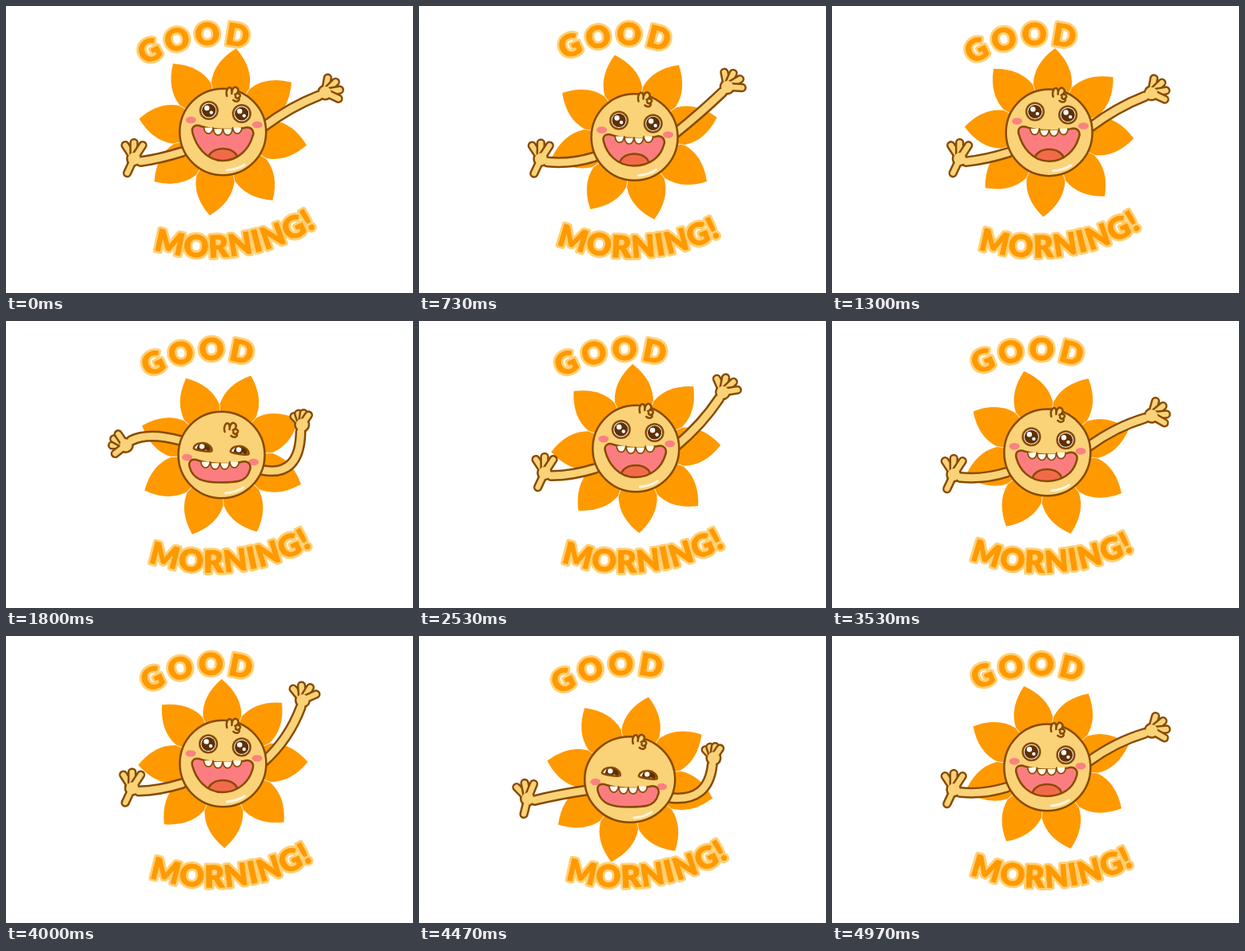
Animation, 509 px wide and 360 px high, one loop 5 s. Source, as an HTML page:

```html
<!DOCTYPE html>
<html lang="en">
<head>
<meta charset="utf-8">
<title>Good morning</title>
<style>
  html, body { margin: 0; width: 100%; height: 100%; overflow: hidden; background: #fff; }
  svg { display: block; width: 100%; height: 100%; }
  .line { stroke: #874b00; stroke-width: 2.5; stroke-linejoin: round; stroke-linecap: round; }
  .limb { fill: none; stroke-linecap: round; stroke-linejoin: round; }
  .word { font: 900 38px Lato, "Open Sans", sans-serif; text-anchor: middle; stroke-linejoin: round; }
  .glow { fill: #ffd074; stroke: #ffd074; stroke-width: 6.5; }
  .ink { fill: #ff9900; stroke: #ff9900; stroke-width: .8; }
</style>
</head>
<body>
<svg viewBox="0 0 509 360" xmlns="http://www.w3.org/2000/svg">
  <defs>
    <path id="upperArc" d="M-164 0A164 164 0 0 1 164 0" transform="translate(263.6 212.4) rotate(-9)"/>
    <path id="lowerArc" d="M-253 0A253 253 0 0 0 253 0" transform="translate(255 62.4) rotate(-8)"/>
    <clipPath id="mouthClip"><path class="mouthShape"/></clipPath>
    <clipPath id="eyeClipL"><path class="eyeShapeL"/></clipPath>
    <clipPath id="eyeClipR"><path class="eyeShapeR"/></clipPath>
  </defs>
  <g id="words" class="word"></g>
  <g id="body">
    <g id="rays" fill="#ff9900"></g>
    <g id="arms"></g>
    <ellipse id="disc" class="line" fill="#fad278"/>
    <path d="M5 48Q18 47 27 41" fill="none" stroke="#fff4dc" stroke-width="3.2" stroke-linecap="round"/>
    <g id="cheeks" fill="#fb8181">
      <ellipse cx="-40" cy="-15" rx="6.5" ry="4.2"/>
      <ellipse cx="43" cy="-9" rx="6.5" ry="4.2"/>
    </g>
    <g clip-path="url(#mouthClip)">
      <path class="mouthShape" fill="#fc7d80"/>
      <ellipse id="tongue" class="line" rx="18" ry="12" fill="#f36a4b"/>
    </g>
    <path class="mouthShape line" fill="none"/>
    <path id="teeth" class="line" fill="#fffbee" style="stroke-width:1.7"/>
    <g id="eyes"></g>
    <path id="hair" class="line" fill="#fad278"
      d="M-9 5C-11 -2 -7 -8 -4 -5C-2 -3 -3 1 -3 2C-3 -5 1 -8 4 -5C7 -2 4 2 1 3C6 0 10 4 6 7C4 9 1 7 2 5M6 7C8 12 2 13 -1 10"/>
  </g>
</svg>
<script>
const find = s => document.querySelector(s);
const set = (el, attrs) => { for (const n in attrs) el.setAttribute(n, attrs[n]); return el; };
const add = (parent, tag, attrs) =>
  parent.appendChild(set(document.createElementNS('http://www.w3.org/2000/svg', tag), attrs));
const setAll = (s, attrs) => document.querySelectorAll(s).forEach(el => set(el, attrs));
const mix = (a, b, u) => Array.isArray(a) ? a.map((v, i) => mix(v, b[i], u)) : a + (b - a) * u;
const smooth = u => (1 - Math.cos(Math.PI * Math.min(1, Math.max(0, u)))) / 2;
// Eases up from a to b, holds, then eases down from c to d
const pulse = (t, a, b, c, d) => smooth((t - a) / (b - a)) * (1 - smooth((t - c) / (d - c)));

const CYCLE = 36;  // steps at 25 per second
const LOOP = 5000;
const SKIN = '#fad278', BROWN = '#874b00', OUTLINE = 5;

function track(keys, step) {
  let i = 1;
  while (i < keys.length - 1 && step > keys[i][0]) i++;
  const [a, from] = keys[i - 1], [b, to] = keys[i];
  return mix(from, to, smooth((step - a) / (b - a)));
}

for (const [text, arc, spacing] of [['GOOD', '#upperArc', 5], ['MORNING!', '#lowerArc', 1.5]])
  for (const layer of ['glow', 'ink']) {
    const line = add(find('#words'), 'text', { class: layer, 'letter-spacing': spacing });
    add(line, 'textPath', { href: arc, startOffset: '50%' }).textContent = text;
  }

for (let i = 0; i < 8; i++)
  add(find('#rays'), 'path', { d: 'M0 0L-24 -59Q-25 -85 0 -106Q25 -85 24 -59Z', transform: `rotate(${i * 45})` });

// An outlined limb: dark arm, separately outlined digits, then light arm and palm
function makeArm(side, palm, digitAngle, digitLength) {
  const g = add(find('#arms'), 'g', { class: 'limb' });
  const stroke = (color, width) => add(g, 'path', { stroke: color, 'stroke-width': width });
  const arm = { side, palm, digitAngle, digitLength };
  const darkArm = stroke(BROWN, 9 + OUTLINE), darkPalm = stroke(BROWN, 15 + OUTLINE);
  arm.digits = [0, 1, 2, 3].map(() => [stroke(BROWN, 6.4 + OUTLINE), stroke(SKIN, 6.4)]);
  arm.lines = [darkArm, stroke(SKIN, 9)];
  arm.palms = [darkPalm, stroke(SKIN, 15)];
  return arm;
}
const leftArm = makeArm(-1, [-8, -4],
  (i, curl) => i < 3 ? mix(-30 + 33 * i, -22 + 28 * i, curl) : mix(-152, -60, curl),
  curl => mix(20, 17, curl));
const rightArm = makeArm(1, [1, -9],
  (i, curl) => mix(-47 + 35 * i, -48 + 26 * i, curl),
  curl => mix(18.5, 14.5, curl));

// pose: shoulder height, bend x y, wrist x y, hand angle, finger curl
function drawArm(arm, [shoulder, bx, by, wx, wy, angle, curl]) {
  const place = `translate(${wx} ${wy}) rotate(${angle})`;
  const [px, py] = arm.palm;
  for (const el of arm.lines) set(el, { d: `M${51 * arm.side} ${shoulder}Q${bx} ${by} ${wx} ${wy}` });
  for (const el of arm.palms) set(el, { transform: place, d: `M${px} ${py}h.1` });
  arm.digits.forEach((pair, i) => {
    const turn = arm.digitAngle(i, curl) * Math.PI / 180, reach = arm.digitLength(curl);
    const d = `M${px} ${py}l${reach * Math.sin(turn)} ${-reach * Math.cos(turn)}`;
    for (const el of pair) set(el, { transform: place, d });
  });
}

function rightPose(step, crouch) {
  const up = [-2, 82, -30, 96, -72, 5, 0];
  const out = [-7, 85, -32, 122, -43, 62, 0];
  const folded = [19 + 4 * crouch, 98, 28, 99 + 4 * crouch, -29 + 11 * crouch, 4, 1];
  const wave = (1 - Math.cos(2 * Math.PI * (step - 16) / 8.4)) / 2;
  return mix(mix(out, up, wave), folded, pulse(step, 0, 3, 12.5, 16));
}

function leftPose(step, sway) {
  const rest = [25, -80, 34, -106 + 3 * sway, 34 + 3 * sway, -3, 0];
  const low = [13, -91, 19, -119, 26, -14, 0];
  const high = [-18, -92, -29, -113, -18, -68, 1];
  return mix(mix(rest, low, pulse(step, 0, 3, 9, 15)), high, pulse(step, 3, 9, 9, 14));
}

const eyes = ['L', 'R'].map(side => {
  const g = add(find('#eyes'), 'g', {});
  const shape = 'eyeShape' + side;
  add(g, 'path', { class: shape, fill: '#fff' });
  const pupil = add(add(g, 'g', { 'clip-path': `url(#eyeClip${side})` }), 'g', {});
  add(pupil, 'circle', { r: 8.6, fill: '#5f3000' });
  add(pupil, 'circle', { cx: -2.5, cy: -3, r: 3.2, fill: '#fff' });
  add(pupil, 'circle', { cx: 3, cy: 2.6, r: 2.2, fill: '#fff' });
  add(g, 'path', { class: shape + ' line', fill: 'none' });
  return { g, pupil, shape: '.' + shape };
});

function drawEye(eye, x, y, squint) {
  const rx = mix(10.8, 11.5, squint), top = mix(10.8, 8.5, squint), bottom = mix(10.8, 1.5, squint);
  set(eye.g, { transform: `translate(${x} ${y + 2.5 * squint}) rotate(${8 * squint})` });
  set(eye.pupil, { transform: `translate(${squint} ${-squint})` });
  setAll(eye.shape, { d: `M${-rx} 0A${rx} ${top} 0 0 1 ${rx} 0A${rx} ${bottom} 0 0 1 ${-rx} 0Z` });
}

function drawMouth(tilt, squint) {
  const lip = -9 + 14 * tilt, chin = 36 - 1.5 * squint, shift = -2 * tilt;
  setAll('.mouthShape', {
    transform: `translate(${shift} 0)`,
    d: `M-38 ${lip + 10}C-40 ${lip + 2} -34 ${lip - 1} -27 ${lip + 2}C-12 ${lip + 7} 12 ${lip + 7} 26 ${lip + 4}` +
       `C36 ${lip + 1} 40 ${lip + 8} 37 ${lip + 15}C33 ${lip + 29} 20 ${chin} 0 ${chin}` +
       `C-22 ${chin} -34 ${lip + 25} -38 ${lip + 10}Z`
  });
  set(find('#tongue'), { cx: -tilt, cy: 33 + 15 * squint });
  const tooth = x => `M${x - 5.7 + shift} ${lip + 5.5 - x * x / 160}a5.7 7.6 0 0 0 11.4 0`;
  set(find('#teeth'), { d: [0, 1, 2, 3].map(i => tooth(-18 + 12 * i)).join('') });
}

function draw(time) {
  const tick = Math.floor((time + 5) * 30 / 1000);
  const step = Math.floor(tick * 5 / 6 + 1e-6) % CYCLE;
  const phase = 2 * Math.PI * step / CYCLE;
  const crouch = pulse(step, 0, 3, 3, 9);
  const squint = pulse(step, 0, 2.5, 10, 14);
  const bow = pulse(step, 3, 8, 10, 16);
  const tilt = track([[0, 0], [3, 1], [9, 1], [18, 0.33], [36, 0]], step);
  const x = 270.4 + 1.2 * Math.cos(phase + Math.PI / 4) - 7 * crouch;
  const y = track([[0, 158], [3, 180], [9, 168], [18, 164.5], [27, 160], [36, 158]], step);

  set(find('#words'), { transform: `rotate(${5 * smooth(step / 18) - 5 * smooth(step / 18 - 1)} 256 158)` });
  set(find('#body'), { transform: `translate(${x} ${y})` });
  set(find('#rays'), { transform: `rotate(${9 + step * 45 / CYCLE})` });
  drawArm(leftArm, leftPose(step, Math.cos(phase)));
  drawArm(rightArm, rightPose(step, crouch));
  set(find('#disc'), { rx: 54 + 2.5 * crouch, ry: 54.3 - 0.6 * crouch });
  set(find('#cheeks'), { transform: `translate(${-3 * tilt} ${18 * tilt})` });
  set(find('#hair'), { transform: `translate(${14 - squint} ${-50 + 16 * bow})` });
  drawMouth(tilt, squint);
  drawEye(eyes[0], -17.5 - 6 * tilt, -27 + 18 * tilt, squint);
  drawEye(eyes[1], 23.5 - tilt, -23 + 18 * tilt, squint);
}

const start = performance.now();
function loop() {
  draw((performance.now() - start) % LOOP);
  requestAnimationFrame(loop);
}
loop();
</script>
</body>
</html>
```
